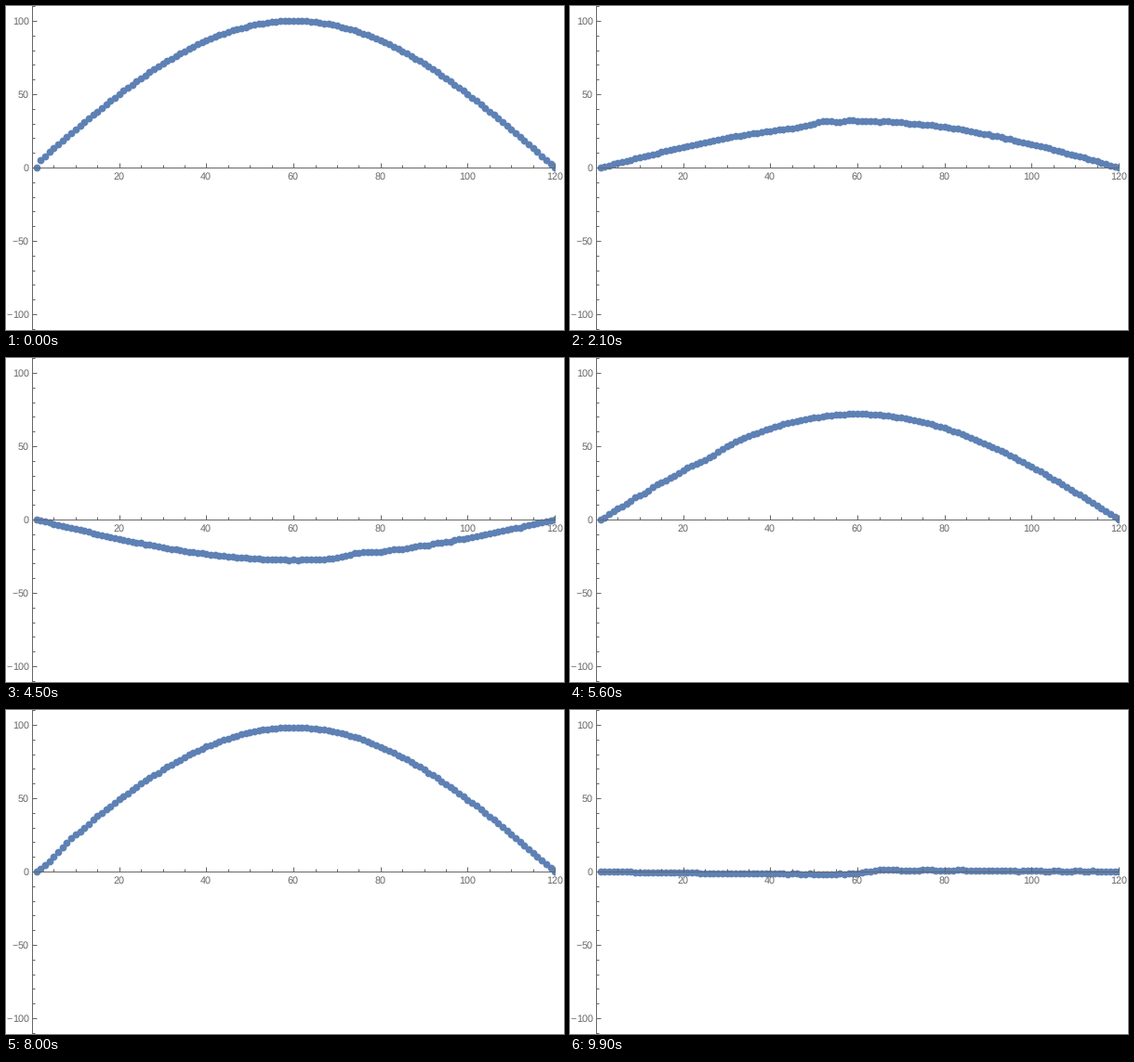
A matplotlib script that plays this animation: 600 px wide and 349 px high, repeating every 10 s.

```python
import numpy as np
import matplotlib.pyplot as plt
from matplotlib.animation import FuncAnimation
from matplotlib.patches import Rectangle

W, H, DPI = 600, 349, 64
FRAMES, INTERVAL = 100, 100
NODES, COURANT, STEPS = 120, 0.9, 10
GRAY, BLUE = "#666666", "#5e81b5"
PX = 72 / DPI  # one pixel in points

plt.rcParams["text.hinting"] = "none"


def px(x):
    return 28.5 + 4.685 * x


def py(y):
    return 174.5 - 1.58 * y


def simulate():
    """Leapfrog solution of the wave equation on a string with fixed ends."""
    u = 100 * np.sin(np.pi * np.arange(1, NODES + 1) / NODES)
    u[0] = u[-1] = 0
    prev, shown = u.copy(), [u.copy()]
    for n in range(1, STEPS * FRAMES):
        new = u.copy()
        bend = u[2:] - 2 * u[1:-1] + u[:-2]
        new[1:-1] = 2 * u[1:-1] - prev[1:-1] + COURANT**2 * bend
        prev, u = u, new
        if n > STEPS and n % STEPS == 1:
            shown.append(u.copy())
    return shown


fig = plt.figure(figsize=(W / DPI, H / DPI), dpi=DPI, facecolor="white")
ax = fig.add_axes([0, 0, 1, 1])
ax.set_xlim(0, W)
ax.set_ylim(H, 0)
ax.axis("off")


def line(x0, y0, x1, y1):
    ax.plot([x0, x1], [y0, y1], color=GRAY, lw=PX, zorder=3,
            solid_capstyle="butt", snap=False)


def label(x, y, text, align):
    ax.text(x, y, text, ha=align, va="baseline", color=GRAY,
            fontsize=10.7 * PX, family="Liberation Sans", zorder=4)


def draw_axes():
    x0, y0 = px(0), py(0)
    line(x0, y0, 590.5, y0)
    line(x0, 0, x0, H)
    for v in range(5, 121, 5):
        major = v % 20 == 0
        x = np.floor(px(v)) + 0.5
        line(x, y0, x, y0 - (5 if major else 3))
        if major:
            label(px(v) - 1, 187, str(v), "center")
    for v in range(-110, 111, 10):
        major = v % 50 == 0
        y = np.floor(py(v)) + 0.5
        line(x0, y, x0 + (5 if major else 3), y)
        if major:
            text = str(abs(v))
            label(25, y + 3, text, "right")
            if v < 0:
                label(24.5 - 5.95 * len(text), y + 3, "\u2212", "right")


states = simulate()
draw_axes()
dots, = ax.plot([], [], "o", color=BLUE, ms=7.8 * PX, mew=0, zorder=2)
dots.set_clip_path(Rectangle((0, 0), 590, H, transform=ax.transData))
# Markers are drawn on whole pixels; half a pixel less keeps them centred.
xs = px(np.arange(1, NODES + 1)) - 0.5


def update(i):
    dots.set_data(xs, py(states[i]) - 0.5)
    return dots,


anim = FuncAnimation(fig, update, frames=FRAMES, interval=INTERVAL,
                     repeat=True, repeat_delay=0, blit=False)
plt.show()
```
